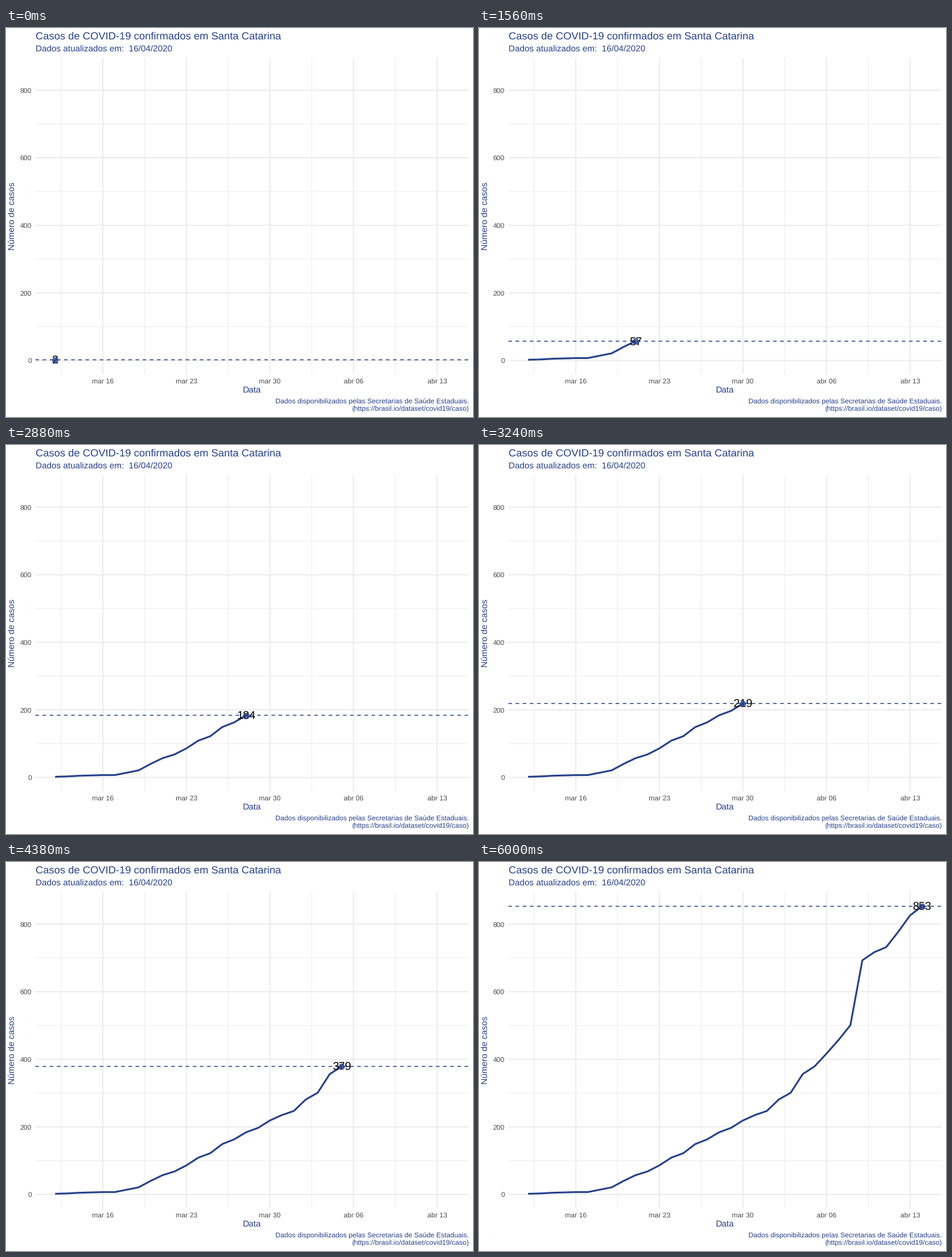
Recreate the animation shown at these times as a matplotlib script. Size 820 px wide and 683 px high, loop 7.86 s.

```python
import math

import matplotlib.pyplot as plt
from matplotlib.animation import FuncAnimation

plt.rcParams["font.family"] = "Liberation Sans"
plt.rcParams["text.hinting"] = "none"

W, H, DPI = 820, 683, 100
FRAMES, INTERVAL = 131, 60
BLUE, GREY, GRID = "#27408B", "#4D4D4D", "#EBEBEB"
LEFT, RIGHT, TOP, BOTTOM = 51.6, 812.4, 52.4, 607.8

CASES = [2, 3, 5, 6, 7, 7, 14, 21, 40, 57, 68, 86, 109, 122, 149, 163, 184,
         197, 219, 235, 247, 281, 301, 356, 379, 417, 457, 501, 693, 717,
         732, 777, 826, 853]
LAST = len(CASES) - 1


def px(width):
    """Pixels to points."""
    return width * 72 / DPI


def day_x(day):
    return 86.2 + 20.96 * day


def case_y(cases):
    return 583.7 - 0.5932 * cases


def first_frame(day):
    """Frame on which a day appears: day 1 on frame 1, the last on frame 100."""
    return 0 if day == 0 else math.ceil((day - 1) * 99 / (LAST - 1) + 0.9)


# The small excess keeps the pixel size from being truncated
fig = plt.figure(figsize=((W + 0.01) / DPI, (H + 0.01) / DPI), dpi=DPI,
                 facecolor="white")
ax = fig.add_axes([0, 0, 1, 1])
ax.set(xlim=(0, W), ylim=(H, 0))
ax.axis("off")


def segment(xs, ys, width, color=GRID, **style):
    return ax.plot(xs, ys, color=color, lw=px(width), snap=False,
                   solid_capstyle="butt", dash_capstyle="butt", **style)[0]


def label(x, y, text, size, color=BLUE, ha="left", **style):
    return ax.text(x, y, text, fontsize=size, color=color, ha=ha,
                   va="baseline", **style)


# Minor grid lines first, then the major ones on top
for shift, width in ((0.5, 0.98), (0, 1.97)):
    for week in range(5):
        x = day_x(4 + 7 * (week - shift))
        segment([x, x], [TOP, BOTTOM], width, zorder=1)
    for step in range(4 if shift else 5):
        y = case_y(200 * (step + shift))
        segment([LEFT, RIGHT], [y, y], width, zorder=1)

for week, name in enumerate(("mar 16", "mar 23", "mar 30", "abr 06", "abr 13")):
    label(day_x(4 + 7 * week), 624, name, 8.8, GREY, "center")
for cases in range(0, 801, 200):
    label(45.3, case_y(cases) + 4.4, str(cases), 8.8, GREY, "right")

label(LEFT, 20, "Casos de COVID-19 confirmados em Santa Catarina", 13.2)
label(LEFT, 42, "Dados atualizados em:  16/04/2020", 11)
label((LEFT + RIGHT) / 2, 640, "Data", 11, ha="center")
ax.text(18, (TOP + BOTTOM) / 2, "Número de casos", fontsize=11, color=BLUE,
        rotation=90, ha="right", va="center")
label(RIGHT, 660, "Dados disponibilizados pelas Secretarias de Saúde Estaduais.",
      8.8, ha="right")
label(RIGHT, 673, "(https://brasil.io/dataset/covid19/caso)", 8.8, ha="right")

curve = segment([], [], 3.15, BLUE, solid_joinstyle="round", zorder=3)
level = segment([], [], 1.57, BLUE, linestyle=(0, (4, 4)), zorder=4)
count = label(0, 0, "", 14.2, "black", "center", zorder=5)
tint = (0x27 / 255, 0x40 / 255, 0x8B / 255, 0.8)
dot, = ax.plot([], [], "o", ms=px(9.9), mfc=tint, mec=tint, mew=px(0.98),
               zorder=6)


def update(frame):
    day = max(d for d in range(LAST + 1) if first_frame(d) <= frame)
    x, y = day_x(day), case_y(CASES[day])
    curve.set_data([day_x(d) for d in range(day + 1)],
                   [case_y(c) for c in CASES[:day + 1]])
    level.set_data([LEFT, RIGHT], [y, y])
    dot.set_data([x], [y])
    count.set_position((x, y + 6.9))
    count.set_text(str(CASES[day]))
    return curve, level, count, dot


anim = FuncAnimation(fig, update, frames=FRAMES, interval=INTERVAL,
                     repeat=True, repeat_delay=0)
plt.show()
```
